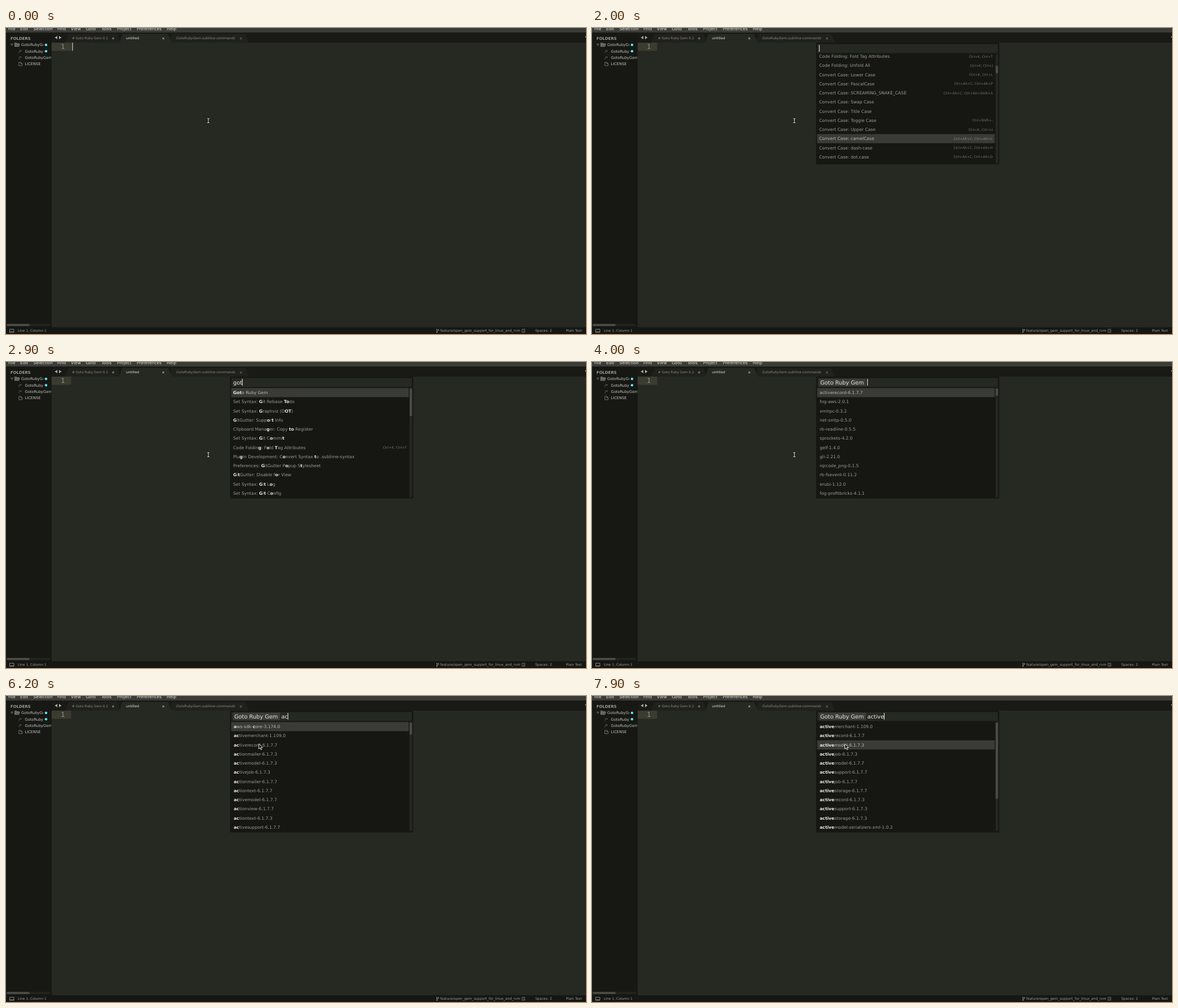
An HTML page with a canvas that plays this animation: 1029x544 px, repeating every 8000 ms.

```html
<!DOCTYPE html>
<html lang="en">
<head>
<meta charset="utf-8">
<title>Editor command palette</title>
<style>
  html, body { margin: 0; width: 100%; height: 100%; overflow: hidden; background: #262822; }
  canvas { display: block; width: 100%; height: 100%; }
</style>
</head>
<body>
<canvas id="stage" width="1029" height="544"></canvas>
<script>
const ctx = document.getElementById('stage').getContext('2d');
const LOOP = 8000, ROW = 16.25, LIST_TOP = 46.3;
const SANS = '"DejaVu Sans", sans-serif';
const EDITOR = '#262822', DARK = '#171814', CARET = '#f8f8f0';

// Asterisks enclose the letters matched by the query.
const lists = {
  got: ['*Got*o Ruby Gem', 'Set Syntax: *G*it Rebase *To*do', 'Set Syntax: *G*raphviz (D*OT*)',
    '*G*itGutter: Supp*o*r*t* Info', 'Clipboard Mana*g*er: Copy *to* Register',
    'Set Syntax: *G*it C*o*mmi*t*', 'Code Foldin*g*: F*o*ld *T*ag Attributes|Ctrl+K, Ctrl+T',
    'Plu*g*in Development: C*o*nvert Syntax *t*o .sublime-syntax',
    'Preferences: *G*itGutter P*o*pup S*t*ylesheet', '*G*i*t*Gutter: Disable f*o*r View',
    'Set Syntax: *G*i*t* L*o*g', 'Set Syntax: *G*i*t* C*o*nfig'],
  all: ['Code Folding: Fold Tag Attributes|Ctrl+K, Ctrl+T', 'Code Folding: Unfold All|Ctrl+K, Ctrl+J',
    'Convert Case: Lower Case|Ctrl+K, Ctrl+L', 'Convert Case: PascalCase|Ctrl+Alt+C, Ctrl+Alt+P',
    'Convert Case: SCREAMING_SNAKE_CASE|Ctrl+Alt+C, Ctrl+Alt+Shift+S', 'Convert Case: Swap Case',
    'Convert Case: Title Case', 'Convert Case: Toggle Case|Ctrl+Shift+-',
    'Convert Case: Upper Case|Ctrl+K, Ctrl+U', 'Convert Case: camelCase|Ctrl+Alt+C, Ctrl+Alt+C',
    'Convert Case: dash-case|Ctrl+Alt+C, Ctrl+Alt+H', 'Convert Case: dot.case|Ctrl+Alt+C, Ctrl+Alt+D'],
  gems: ['activerecord-6.1.7.7', 'fog-aws-2.0.1', 'xmlrpc-0.3.2', 'net-smtp-0.5.0', 'rb-readline-0.5.5',
    'sprockets-4.2.0', 'gelf-1.4.0', 'gli-2.21.0', 'rqrcode_png-0.1.5', 'rb-fsevent-0.11.2',
    'erubi-1.12.0', 'fog-profitbricks-4.1.1'],
  ac: ['*a*ws-sdk-*c*ore-3.174.0', ...['tivemerchant-1.109.0', 'tiverecord-6.1.7.7', 'tionmailer-6.1.7.3',
    'tivemodel-6.1.7.3', 'tivejob-6.1.7.3', 'tionmailer-6.1.7.7', 'tiontext-6.1.7.7', 'tivemodel-6.1.7.7',
    'tionview-6.1.7.7', 'tiontext-6.1.7.3', 'tivesupport-6.1.7.7'].map(s => '*ac*' + s)],
  active: ['merchant-1.109.0', 'record-6.1.7.7', 'model-6.1.7.3', 'job-6.1.7.3', 'model-6.1.7.7',
    'support-6.1.7.7', 'job-6.1.7.7', 'storage-6.1.7.7', 'record-6.1.7.3', 'support-6.1.7.3',
    'storage-6.1.7.3', 'model-serializers-xml-1.0.2'].map(s => '*active*' + s)
};

// Each step changes only the listed properties; caret is an opacity.
const steps = [
  [0, { caret: 1, mouse: null }],
  [100, { caret: .5 }],
  [200, { caret: 0 }],
  [1000, { list: 'got', query: 'got', marked: true, row: 0, shift: 0, thumb: [46.5, 50], caret: 1 }],
  [1100, { caret: .5 }],
  [1200, { caret: 0 }],
  [1400, { caret: 1 }],
  [2000, { list: 'all', query: '', marked: false, row: 9, shift: -4, thumb: [67, 13.5] }],
  [2300, { caret: 0 }],
  [2500, { caret: 1 }],
  [2600, { list: 'got', query: 'g', row: 0, shift: 0, thumb: [46.5, 24] }],
  [2800, { query: 'go', thumb: [46.5, 36] }],
  [2900, { query: 'got', thumb: [46.5, 50] }],
  [3400, { caret: 0 }],
  [3600, { caret: 1 }],
  [4000, { list: 'gems', query: '', chip: true, thumb: [46.5, 13.5] }],
  [4300, { caret: 0, mouse: [400, 115] }],
  [4400, { mouse: [424, 65] }],
  [4600, { caret: 1, mouse: [441, 55] }],
  [4700, { mouse: [455, 57] }],
  [4800, { caret: 0, mouse: [463, 60] }],
  [5000, { mouse: [448.5, 85] }],
  [5200, { caret: .5 }],
  [5300, { caret: 1 }],
  [5600, { caret: .5 }],
  [5700, { list: 'ac', query: 'a', caret: 1 }],
  [6200, { query: 'ac', thumb: [46.5, 22.5] }],
  [6400, { list: 'active', query: 'act', thumb: [46.5, 110] }],
  [6500, { query: 'activ', thumb: [46.5, 136.5] }],
  [6600, { query: 'active' }],
  [7000, { caret: .5 }],
  [7100, { caret: 0 }],
  [7200, { caret: 1 }],
  [7700, { caret: .5 }],
  [7800, { caret: 1, row: 1 }],
  [7900, { row: 2 }]
];

function stateAt(time) {
  return Object.assign({}, ...steps.filter(s => s[0] <= time).map(s => s[1]));
}

function rect(x, y, w, h, color) {
  ctx.fillStyle = color;
  ctx.fillRect(x, y, w, h);
}

function rounded(x, y, w, h, r, color) {
  ctx.fillStyle = color;
  ctx.beginPath();
  ctx.roundRect(x, y, w, h, r);
  ctx.fill();
}

function shape(path, fill, stroke, width = .8) {
  const p = new Path2D(path);
  if (fill) { ctx.fillStyle = fill; ctx.fill(p); }
  if (stroke) { ctx.strokeStyle = stroke; ctx.lineWidth = width; ctx.stroke(p); }
}

function dot(x, y, r, color) {
  ctx.fillStyle = color;
  ctx.beginPath();
  ctx.arc(x, y, r, 0, 7);
  ctx.fill();
}

// Draws text and returns its width.
function text(s, x, y, size, color, style = '', family = SANS) {
  ctx.font = `${style} ${size}px ${family}`;
  ctx.fillStyle = color;
  ctx.fillText(s, x, y);
  return ctx.measureText(s).width;
}

function clipped(x, y, w, h, draw) {
  ctx.save();
  ctx.beginPath();
  ctx.rect(x, y, w, h);
  ctx.clip();
  draw();
  ctx.restore();
}

function drawMenu() {
  rect(0, 0, 1029, 8, '#3b3c38');
  const items = { File: 4, Edit: 25, Selection: 48.5, Find: 91, View: 115, Goto: 141.5,
    Tools: 169, Project: 197, Preferences: 232, Help: 285 };
  for (const [name, x] of Object.entries(items)) text(name, x, 4, 7.5, '#dddcd6');
}

function drawSidebar() {
  const label = '#c5c6c0', icon = '#85867f';
  rect(0, 8, 81, 524, DARK);
  text('FOLDERS', 8, 21, 6.9, '#9b9c95', 'bold');
  shape('M8.5 28.3h4l-2 3.2z', null, icon, .7);
  shape('M15.5 33V26.5h3l1 1.2h4v1.2M15.5 33l1.8-4h7l-1.5 4z', '#5d5e58', icon, .7);
  clipped(0, 20, 66, 30, () => {
    text('GotoRubyGem', 27, 32.2, 6.65, label);
    text('GotoRubyGem.py', 33.5, 43.6, 6.65, label);
  });
  clipped(0, 46, 80.5, 12, () => text('GotoRubyGem.sublime-commands', 33.5, 54.9, 6.65, label));
  text('LICENSE', 33.5, 66.3, 6.65, label);
  text('/*', 22.5, 43.5, 6.5, icon);
  text('/*', 22.5, 54.8, 6.5, icon);
  shape('M22.8 61h3.6l2.4 2.4v3.6h-6zM26.2 61v2.6h2.6', null, icon, .8);
  dot(71, 30, 2.3, '#66d9ef');
  dot(71, 41.3, 2.3, '#66d9ef');
  rounded(1, 526, 78, 4, 2, '#22231e');
  rounded(1, 526, 41, 4, 2, '#494a45');
}

function drawTabs() {
  rect(81, 8, 948, 18, '#191a16');
  shape('M91 14v6l-4.5-3zM94 14v6l4.5-3z', '#aaaba4');
  shape('M105 26l5-14q1-1.5 2-1.5h84q1.500 0 2 1.500l5 14z', '#20211c');
  shape('M289 26l5-14q1-1.500 2-1.500h127q1.500 0 2 1.500l6 14z', '#20211c');
  shape('M201 26l5-14q1-1.500 2-1.500h78q1.500 0 2 1.500l6 14z', EDITOR);
  text('# Goto Ruby Gem 0.1', 117, 20.200, 5.850, '#8b8c84');
  dot(190, 18.500, 1.900, '#6a6b64');
  text('untitled', 213, 20.200, 5.950, '#e6e6df');
  text('GotoRubyGem.sublime-commands', 302, 20.200, 6, '#8b8c84', 'italic');
  shape('M277.500 17l3.200 3.200m0-3.200l-3.200 3.200', null, '#c4c5be', 1);
  shape('M415.200 17l3.200 3.200m0-3.200l-3.200 3.200', null, '#7e7f78', 1);
  shape('M1027 15h5l-2.500 3z', '#aaaba4');
}

function drawStatus() {
  const color = '#9d9e97';
  rect(0, 532, 1029, 12, '#161713');
  shape('M6.500 535.500h7.500v5.500h-7.500zM6.500 540h7.500', null, color, .8);
  text('Line 1, Column 1', 21, 540.200, 6, color);
  shape('M764.500 536v5M767.300 536.500v1q0 1.300-2.800 1.800', null, color, .8);
  dot(764.500, 536, .9, color);
  dot(764.500, 541, .9, color);
  dot(767.300, 536.500, .9, color);
  text('feature/open_gem_support_for_linux_and_rvm', 770.300, 540.200, 6.150, color);
  shape('M915.500 535.500h5v5.500h-5z', null, color, .6);
  text('1', 916.700, 540, 4.500, color);
  text('Spaces: 2', 939, 540.200, 6.080, color);
  text('Plain Text', 993.500, 540.200, 5.950, color);
}

function drawCaret(x, y, h, opacity) {
  ctx.globalAlpha = opacity;
  rect(x, y, 1, h, CARET);
  ctx.globalAlpha = 1;
}

// Highlights at most `count` of the enclosed letters.
function drawRow(row, x, y, count, selected) {
  const [label, keys] = row.split('|');
  label.split('*').forEach((part, i) => {
    const n = i % 2 ? Math.min(count, part.length) : 0;
    count -= n;
    if (n) x += text(part.slice(0, n), x, y, 7.6, '#e9e9e2', 'bold');
    x += text(part.slice(n), x, y, 7.6, selected ? '#b9bab3' : '#9b9c95');
  });
  if (keys) {
    ctx.textAlign = 'right';
    text(keys, 711, y - .6, 5.95, selected ? '#8a8b84' : '#73746d');
    ctx.textAlign = 'left';
  }
}

function drawPalette(s) {
  rounded(397.5, 26, 325, 216.500, 1.500, '#161713');
  rect(400, 28.500, 320, 16, EDITOR);
  let x = 403;
  if (s.chip) {
    rounded(403, 29.700, 83, 13, 1, '#3d3e39');
    text('Goto Ruby Gem', 405, 39.800, 9.800, '#e0e0d9');
    x = 488.5;
  }
  if (s.marked) rect(403, 30, 16.500, 12, '#49483e');
  const width = text(s.query, x, 39.800, 9.750, '#eeeee7');
  drawCaret(s.query ? x + width - .2 : x - .2, 30, 12, s.caret);

  clipped(398, 46, 324, 195, () => {
    lists[s.list].forEach((row, i) => {
      const y = LIST_TOP + s.shift + i * ROW, selected = i === s.row;
      if (selected) rect(399.500, y, 315, ROW, '#3a3b37');
      drawRow(row, s.chip ? 404 : 403, y + 10.800, s.query.length, selected);
    });
  });
  rounded(716, 46.500, 4.500, 194, 2, '#262722');
  rounded(716, s.thumb[0], 4.500, s.thumb[1], 2, '#494a45');
}

function drawMouse(pos) {
  ctx.save();
  if (pos) {
    ctx.translate(...pos);
    shape('M0 0v9l2.200-1.800 1.500 3.300 1.600-.7-1.500-3.200h3z', '#181818', '#f2f2ee', .9);
  } else {
    const beam = 'M357 161h1.300l.7.600.7-.600H361M359 161.500v6.500M357 168.500h1.300l.7-.600.7.600H361';
    shape(beam, null, '#10110e', 2.600);
    shape(beam, null, '#deded8', 1.100);
  }
  ctx.restore();
}

function draw() {
  const s = stateAt(performance.now() % LOOP);
  ctx.textRendering = 'geometricPrecision';
  rect(0, 0, 1029, 544, EDITOR);
  drawMenu();
  drawSidebar();
  drawTabs();
  drawStatus();
  rect(81, 26, 34.500, 14.500, '#3b3b30');
  text('1', 97.300, 37.300, 11.800, '#90918a', '', '"DejaVu Sans Mono", monospace');
  if (s.list) drawPalette(s);
  else {
    rect(115.500, 26, 2, 14.500, '#30312a');
    drawCaret(117.500, 26, 14.500, s.caret);
  }
  drawMouse(s.mouse);
  requestAnimationFrame(draw);
}
draw();
</script>
</body>
</html>
```
